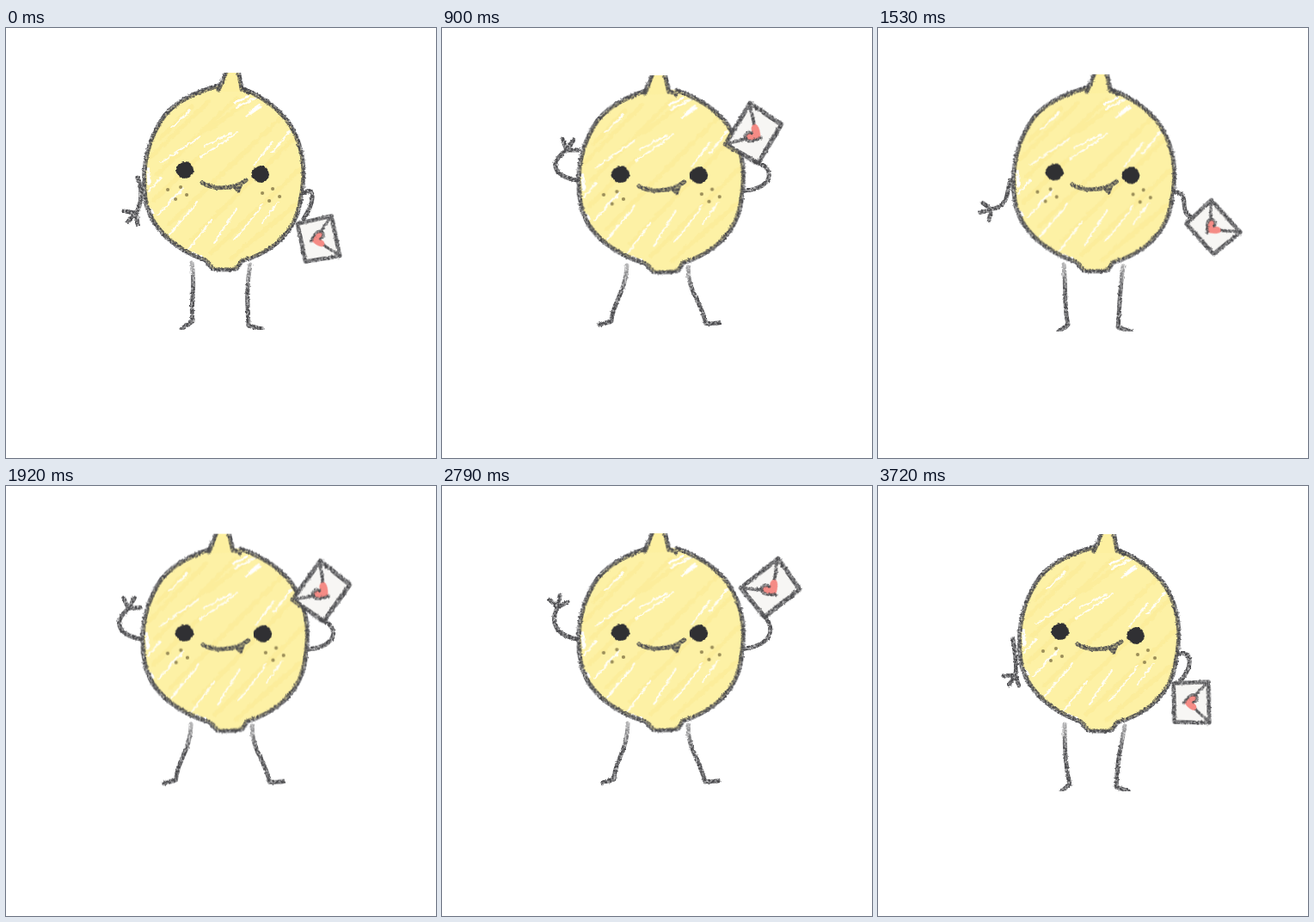
Animation of 500x500 px, one loop 3750 ms. Source, as an HTML page without scripts:

```html
<!DOCTYPE html>
<html lang="en">
<head>
<meta charset="utf-8">
<title>Lemon jumping jacks</title>
<style>
html, body { margin: 0; width: 100%; height: 100%; overflow: hidden; background: #fff; }
svg { display: block; width: 100vw; height: 100vh; }

.ink { fill: none; stroke: #4a4a4d; stroke-width: 5; stroke-linecap: round; stroke-linejoin: round; }
.limb { animation: bend 3.75s linear infinite; }
.part { animation: move 3.75s linear infinite; }
.hop { animation: hop 3.75s ease-in-out infinite; }

/* Poses: start, low, hang, mid, raised, up */
.left-arm {
  --start: path("M153 174C158 185 159 203 151 215M151 215L137 213M151 215L142 225M151 215L153 228");
  --low: path("M157 174C158 186 163 203 160 216M160 216L146 217M160 216L153 227M160 216L164 228");
  --hang: path("M154 175C150 183 154 206 132 209M132 209L122 202M132 209L119 213M132 209L129 222");
  --mid: path("M159 175C146 174 143 206 119 171M119 171L124 160M119 171L110 160M119 171L106 172");
  --raised: path("M157 175C135 171 125 158 134 138M134 138L125 129M134 138L137 124M134 138L146 132");
  --up: path("M157 174C138 171 118 158 145 139M145 139L140 126M145 139L153 127M145 139L159 139");
}
.right-arm {
  --start: path("M346 192C359 183 360 201 346 222");
  --low: path("M350 191C364 187 368 205 352 222");
  --hang: path("M345 189C364 189 349 211 363 218");
  --mid: path("M349 194C365 197 380 201 391 193");
  --raised: path("M353 186C388 180 385 160 375 148");
  --up: path("M353 186C385 183 389 160 364 152");
}
.left-leg {
  --start: path("M216 273C221 302 214 318 217 341L204 350");
  --low: path("M217 273C217 302 218 322 223 343L213 352");
  --hang: path("M216 273C219 302 216 322 221 343L209 352");
  --mid: path("M217 273C218 302 212 316 214 343L201 351");
  --raised: path("M216 273C216 305 200 318 200 338L187 342");
  --up: path("M215 273C214 305 198 316 197 338L183 342");
}
.right-leg {
  --start: path("M284 275C279 302 281 322 282 346L297 350");
  --low: path("M287 275C282 302 277 322 277 346L291 351");
  --hang: path("M285 275C281 302 281 322 279 346L294 351");
  --mid: path("M286 275C282 304 291 320 291 347L305 351");
  --raised: path("M286 275C286 304 300 316 306 341L321 340");
  --up: path("M286 275C286 304 302 316 307 341L322 340");
}
.letter {
  --start: translate(363px, 246px) rotate(77deg) scale(.9, .96);
  --low: translate(364px, 248px) rotate(88deg) scale(.9, .96);
  --hang: translate(389px, 231px) rotate(47deg) scale(.95);
  --mid: translate(420px, 184px) rotate(6deg);
  --raised: translate(383px, 116px) rotate(-39deg) scale(1.04);
  --up: translate(363px, 120px) rotate(-60deg) scale(1.05);
}
.body {
  transform-origin: 253px 280px;
  --start: translateX(0) rotate(0deg) scaleX(1);
  --low: translateX(4px) rotate(0deg) scaleX(1);
  --hang: translateX(-1px) rotate(-.6deg) scaleX(1.01);
  --mid: translateX(3px) rotate(-.8deg) scaleX(1.02);
  --raised: translateX(6px) rotate(-2.4deg) scaleX(1.035);
  --up: translateX(6px) rotate(-2.4deg) scaleX(1.035);
}
.stem {
  --start: translateX(0);
  --low: translateX(0);
  --hang: translateX(-1px);
  --mid: translateX(-1px);
  --raised: translateX(-8px);
  --up: translateX(-8px);
}

@keyframes bend {
  0%, 100% { d: var(--start); }
  6%, 10.5%, 89.1%, 99.2% { d: var(--low); }
  12.3%, 34.4%, 40.8%, 59.6%, 65.5%, 86.8% { d: var(--hang); }
  14.4%, 31.2%, 44.3%, 56.8%, 68.3%, 84% { d: var(--mid); }
  17.2%, 28.3%, 46.7%, 54.1%, 71.5%, 74.4%, 81% { d: var(--raised); }
  21%, 25%, 50.4%, 77% { d: var(--up); }
}
@keyframes move {
  0%, 100% { transform: var(--start); }
  6%, 10.5%, 89.1%, 99.2% { transform: var(--low); }
  12.3%, 34.4%, 40.8%, 59.6%, 65.5%, 86.8% { transform: var(--hang); }
  14.4%, 31.2%, 44.3%, 56.8%, 68.3%, 84% { transform: var(--mid); }
  17.2%, 28.3%, 46.7%, 54.1%, 71.5%, 74.4%, 81% { transform: var(--raised); }
  21%, 25%, 50.4%, 77% { transform: var(--up); }
}
@keyframes hop {
  0%, 100% { transform: translateY(0); }
  5% { transform: translateY(2px); }
  11.5% { transform: translateY(9px); }
  17.2% { transform: translateY(-11px); }
  21% { transform: translateY(5px); }
  24% { transform: translateY(3px); }
  27.2% { transform: translateY(8px); }
  31.2% { transform: translateY(-9px); }
  36.8% { transform: translateY(10px); }
  40.8% { transform: translateY(2px); animation-timing-function: ease-out; }
  44.2% { transform: translateY(-10px); }
  48% { transform: translateY(8px); }
  50.4% { transform: translateY(3px); }
  53.4% { transform: translateY(7px); }
  56.6% { transform: translateY(-9px); animation-timing-function: ease-in; }
  61.6% { transform: translateY(0); animation-timing-function: ease-out; }
  64.5% { transform: translateY(9px); }
  69.3% { transform: translateY(-12px); }
  74.4% { transform: translateY(3px); }
  79% { transform: translateY(8px); }
  83.5% { transform: translateY(-9px); }
  84% { transform: translateY(-8px); animation-timing-function: ease-in; }
  86.4% { transform: translateY(-2px); animation-timing-function: ease-out; }
  89.2% { transform: translateY(7px); }
  94% { transform: translateY(0); }
  99.2% { transform: translateY(4px); }
}
</style>
</head>
<body>
<svg viewBox="0 0 500 500">
  <defs>
    <filter id="crayon" filterUnits="userSpaceOnUse" x="0" y="0" width="500" height="500" color-interpolation-filters="sRGB">
      <feTurbulence type="fractalNoise" baseFrequency=".4" numOctaves="2" seed="4" result="noise"/>
      <feDisplacementMap in="SourceGraphic" in2="noise" scale="3" xChannelSelector="R" yChannelSelector="G" result="rough"/>
      <feColorMatrix in="noise" values="0 0 0 0 0  0 0 0 0 0  0 0 0 0 0  0 0 0 1.6 0"/>
      <feComposite in="rough" operator="in"/>
      <feGaussianBlur stdDeviation=".4"/>
    </filter>
    <filter id="rough" filterUnits="userSpaceOnUse" x="0" y="0" width="500" height="500" color-interpolation-filters="sRGB">
      <feTurbulence type="fractalNoise" baseFrequency=".2" numOctaves="2" seed="9"/>
      <feDisplacementMap in="SourceGraphic" scale="5" xChannelSelector="R" yChannelSelector="G"/>
    </filter>
    <linearGradient id="fade" gradientUnits="userSpaceOnUse" x1="0" y1="272" x2="0" y2="304">
      <stop stop-color="#4a4a4d" stop-opacity=".45"/>
      <stop offset="1" stop-color="#4a4a4d"/>
    </linearGradient>
    <path id="skin" d="M232 270C195 257 168 231 163 199C158 160 165 128 185 101C201 82 224 74 247 67L275 70C306 84 330 102 340 133C348 155 347 181 341 207C333 242 306 262 274 271L268 280L240 280Z"/>
    <clipPath id="inside"><use href="#skin"/></clipPath>
    <clipPath id="sheet"><rect y="52" width="500" height="298.5"/></clipPath>
  </defs>

  <g class="hop"><g clip-path="url(#sheet)">
    <g class="ink" filter="url(#crayon)">
      <g style="stroke:url(#fade)">
        <path class="limb left-leg"/>
        <path class="limb right-leg"/>
      </g>
      <path class="limb left-arm"/>
      <path class="limb right-arm"/>
    </g>

    <g class="part body">
      <use href="#skin" fill="#fdf1a5"/>
      <g clip-path="url(#inside)"><g filter="url(#rough)" fill="none" stroke-linecap="round">
        <path stroke="#fbec98" stroke-width="5" opacity=".7" d="M168 150L235 86M176 170L268 82M190 228L318 106M216 246L335 128M238 262L342 164M180 128L215 92M262 268L338 204M236 118L282 84M172 200L224 150"/>
        <path stroke="#fffef4" stroke-width="2" d="M176 218L206 186M180 157L226 126M226 150L270 121M190 240L222 203M212 258L240 222M242 250L268 210M266 246L298 206M230 138L262 122M268 92L292 80M280 103L296 92M308 146L330 120M298 226L316 202M192 116L214 96M288 160L310 132M166 190L180 174"/>
        <path stroke="#fff" stroke-width="3.5" d="M267 86L281 80M284 98L296 90M165 208L171 215M228 267L216 262M166 180L165 164"/>
      </g></g>
      <g class="ink" filter="url(#crayon)">
        <path d="M247 67C224 74 201 82 185 101C165 128 157 160 162 199C167 231 195 257 232 270L240 280C250 282 260 281 268 280L274 271C306 262 333 242 341 207C347 181 348 155 340 133C330 102 306 84 275 70"/>
        <path d="M228 180C242 189 266 187 279 177"/>
        <path fill="#858580" stroke-width="4" d="M265 184L270 190L273 182Z"/>
      </g>
      <g filter="url(#rough)" fill="#303033">
        <circle cx="208" cy="165" r="10"/>
        <circle cx="296" cy="170" r="10"/>
      </g>
      <path fill="none" stroke="#9a8d58" stroke-width="4" stroke-linecap="round" d="M188 188h.1M203 185h.1M197 199h.1M210 194h.1M298 192h.1M310 187h.1M306 201h.1M318 196h.1"/>
      <g class="part stem">
        <path fill="#fdf0a0" d="M247 74L257 50H270L275 74Z"/>
        <path class="ink" filter="url(#crayon)" d="M247 72L257 49M270 49L274 71L282 75"/>
      </g>
    </g>

    <g class="part letter">
      <path fill="#f7f6f4" d="M-25-21L26-20L23 20L-25 19Z"/>
      <path fill="#f58b85" d="M0 8C-9 1-11-3-8-6C-4-8-1-5 0-2C2-6 6-8 10-5C11-1 7 4 0 8Z"/>
      <g transform="translate(-250 -250)"><g filter="url(#crayon)" class="ink">
        <path d="M224 228L277 229L274 271L224 270Z"/>
        <path stroke-width="3.5" d="M227 231L241 245M260 244L274 231"/>
        <path stroke-width="3.5" d="M250 259C239 251 238 246 242 243C246 241 249 244 250 247"/>
      </g></g>
    </g>
  </g></g>
</svg>
</body>
</html>
```
